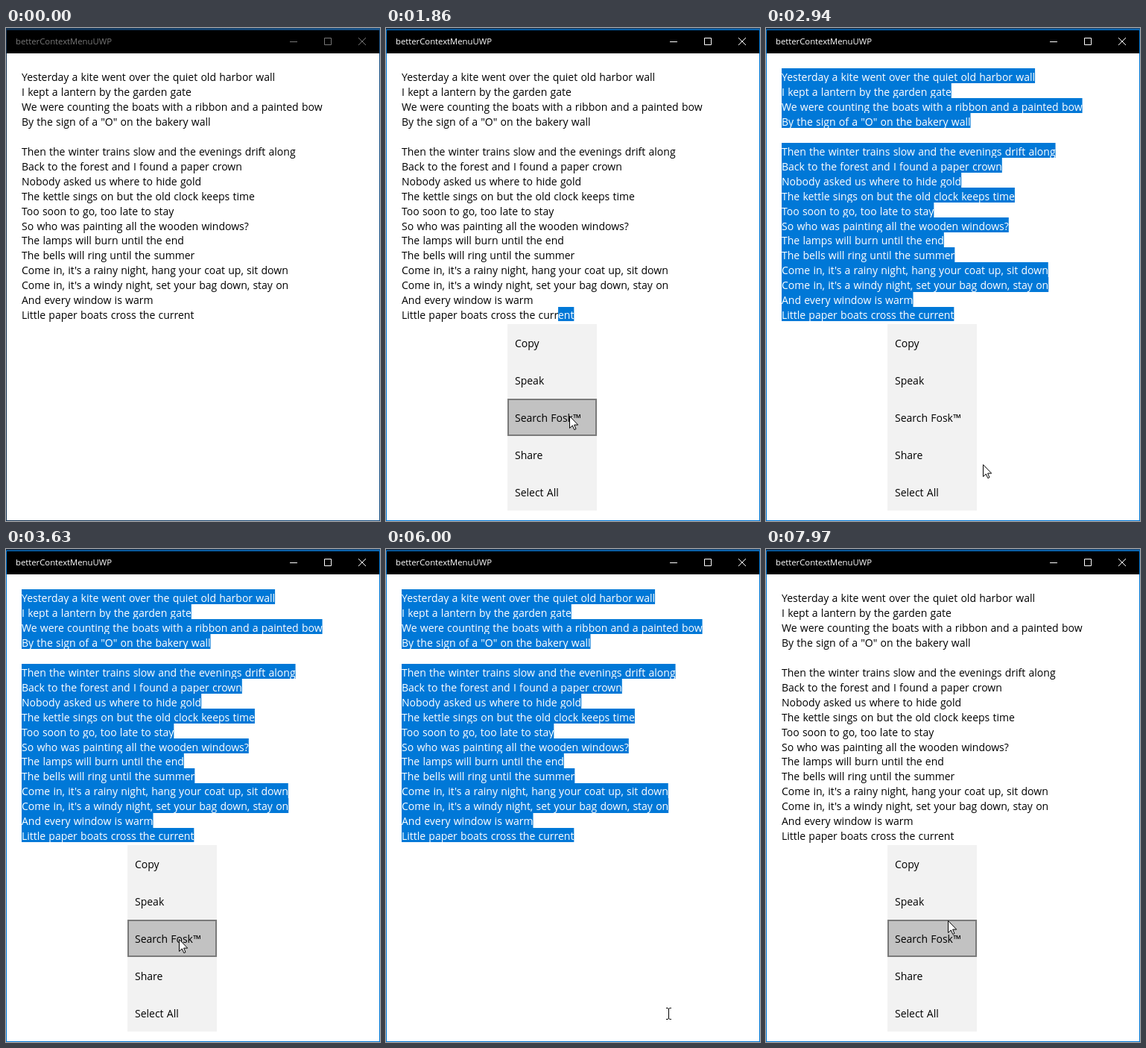
An HTML page that plays this animation: 502x661 px, repeating every 8000 ms.

```html
<!DOCTYPE html>
<html lang="en">
<head>
<meta charset="utf-8">
<title>Context menu</title>
<style>
  html, body { margin: 0; width: 100%; height: 100%; overflow: hidden; background: #fff; }
  svg { display: block; width: 502px; height: 661px; }
  text { font: 14px "Open Sans", "Noto Sans", sans-serif; word-spacing: .6px; white-space: pre; }
  #title { font-size: 11.3px; }
</style>
</head>
<body>
<svg id="stage" viewBox="0 0 502 661" xmlns="http://www.w3.org/2000/svg">
  <linearGradient id="desk">
    <stop offset="0" stop-color="#12304f"/>
    <stop offset="1" stop-color="#1a5286"/>
  </linearGradient>
  <rect width="502" height="661" fill="#fff"/>
  <rect width="502" height="3" fill="url(#desk)"/>
  <rect y="3" width="502" height="31" fill="#000"/>
  <rect id="frame" x=".5" y="2.5" width="501" height="658" fill="none"/>
  <text id="title" x="13" y="22">betterContextMenuUWP</text>
  <path id="buttons" fill="none" d="M381 18.5h10M427.5 13.5h9v9h-9zM473 13l10 10M483 13l-10 10"/>
  <g id="page"></g>
  <g id="menu"></g>
  <path id="arrow" fill="#fff" stroke="#000" d="M.5 .5V16.5L4.3 13L6.8 18.6L9 17.6L6.6 12.1H11.7Z"/>
  <path id="beam" fill="none" stroke="#000" d="M-3 -7.5H-1L.5 -6.5L2 -7.5H4M.5 -6.5V6.5M-3 7.5H-1L.5 6.5L2 7.5H4"/>
</svg>
<script>
const LOOP = 8000, TICK = 75;
const PITCH = 19.95, LEFT = 21, TAIL = 3;
const MENU = { x: 163, y: 397, w: 120, row: 50 };

const lines = `Yesterday a kite went over the quiet old harbor wall
I kept a lantern by the garden gate
We were counting the boats with a ribbon and a painted bow
By the sign of a "O" on the bakery wall

Then the winter trains slow and the evenings drift along
Back to the forest and I found a paper crown
Nobody asked us where to hide gold
The kettle sings on but the old clock keeps time
Too soon to go, too late to stay
So who was painting all the wooden windows?
The lamps will burn until the end
The bells will ring until the summer
Come in, it's a rainy night, hang your coat up, sit down
Come in, it's a windy night, set your bag down, stay on
And every window is warm
Little paper boats cross the current`.split("\n");
const items = ["Copy", "Speak", "Search Fosk™", "Share", "Select All"];

// Moments in ms
const at = {
  enter: 210, focus: 680, mark: 1080, menu: 1160, aim: 1470,
  pressAll: 2400, markAll: 2470, pressSpeak: 4010, fade: 4180, close: 4250,
  relax: 5340, reopen: 6890, aimAgain: 7590
};

// Each glide starts where the one before it ended
const origin = { x: 402, y: 608 };
const glides = [
  { from: at.enter, to: 360, x: 198, y: 412 },
  { from: 530, to: 910, x: 234, y: 384 },
  { from: at.mark, to: at.menu, x: 254, y: 397 },
  { from: at.aim, to: 1860, x: 246, y: 520 },
  { from: 1930, to: 2090, x: 243, y: 620 },
  { from: 2700, to: 2940, x: 291, y: 585 },
  { from: 3010, to: 3480, x: 236, y: 562 },
  { from: 3630, to: 3710, x: 228, y: 484 },
  { from: 5510, to: 5660, x: 320, y: 603 },
  { from: 5810, to: 6120, x: 418, y: 637 },
  { from: 6200, to: 6430, x: 258, y: 429 },
  { from: 7510, to: 7510, x: 256, y: 395 },
  { from: at.aimAgain, to: 7970, x: 244, y: 498 }
];

const byId = id => document.getElementById(id);
const within = (t, a, b) => t >= a && t < b;
const set = (el, attrs) => { for (const k in attrs) el.setAttribute(k, attrs[k]); };
const mix = (a, b, p) => Math.round(a + (b - a) * p);

function add(parent, tag, attrs, text) {
  const el = document.createElementNS("http://www.w3.org/2000/svg", tag);
  set(el, attrs || {});
  if (text) el.textContent = text;
  return parent.appendChild(el);
}

const rows = lines.map((line, i) => {
  const top = n => Math.round(54.3 + PITCH * n);
  const mark = add(byId("page"), "rect", { y: top(i), height: top(i + 1) - top(i), fill: "#0078d7" });
  const text = add(byId("page"), "text", { x: LEFT, y: Math.round(71 + PITCH * i) });
  const cut = Math.max(0, line.length - TAIL);
  const head = add(text, "tspan", {}, line.slice(0, cut));
  const tail = add(text, "tspan", {}, line.slice(cut));
  return { mark, text, head, tail, cut };
});

add(byId("menu"), "rect", { x: MENU.x, y: MENU.y, width: MENU.w, height: MENU.row * items.length, fill: "#f2f2f2" });
const entries = items.map((label, i) => {
  const y = MENU.y + i * MENU.row;
  const group = add(byId("menu"), "g");
  const back = add(group, "rect", { x: MENU.x, y, width: MENU.w, height: MENU.row, fill: "none" });
  const edge = add(group, "rect", { x: MENU.x + 1, y: y + 1, width: MENU.w - 2, height: MENU.row - 2,
    fill: "none", stroke: "#7a7a7a", "stroke-width": 2 });
  add(group, "text", { x: MENU.x + 10, y: y + 31 }, label);
  return { group, back, edge, cx: MENU.x + MENU.w / 2, cy: y + MENU.row / 2 };
});

function pointerAt(t) {
  let pos = origin;
  for (const { from, to, x, y } of glides) {
    if (t < from) break;
    const steps = Math.round((to - from) / TICK) + 1;
    const p = Math.min(1, (Math.floor((t - from) / TICK) + 1) / steps);
    pos = { x: mix(pos.x, x, p), y: mix(pos.y, y, p) };
  }
  return pos;
}

function drawWindow(active) {
  const ink = active ? "#fff" : "#777";
  set(byId("frame"), { stroke: active ? "#0078d7" : "url(#desk)" });
  set(byId("title"), { fill: ink });
  set(byId("buttons"), { stroke: ink });
}

function drawSelection(mode) {
  rows.forEach(({ mark, text, head, tail, cut }, i) => {
    const all = mode === "all", end = all || (mode === "tail" && i === rows.length - 1);
    const full = text.getComputedTextLength();
    const start = all || !cut ? 0 : text.getSubStringLength(0, cut);
    set(mark, { x: LEFT + start, width: end ? full - start : 0 });
    set(head, { fill: all ? "#fff" : "#000" });
    set(tail, { fill: end ? "#fff" : "#000" });
  });
}

function drawMenu(t, hover, pressed) {
  const open = within(t, at.menu, at.close) || t >= at.reopen;
  const step = Math.floor((t - (t >= at.reopen ? at.reopen : at.menu)) / TICK);
  const shift = -Math.round(4 * Math.pow(.48, step));
  const alpha = within(t, at.fade, at.close) ? .4 : 1 - .42 * Math.pow(.35, step);
  set(byId("menu"), { display: open ? "inline" : "none", opacity: alpha, transform: `translate(0 ${shift})` });
  entries.forEach(({ group, back, edge, cx, cy }, i) => {
    const down = i === pressed, over = i === hover && !down;
    set(back, { fill: down ? "#929292" : over ? "#c2c2c2" : "none" });
    set(edge, { display: over ? "inline" : "none" });
    set(group, { transform: down ? `translate(${cx} ${cy}) scale(.983) translate(${-cx} ${-cy})` : "" });
  });
}

function draw(t) {
  const { x, y } = pointerAt(t);
  const isArrow = within(t, at.aim, at.relax) || t >= at.aimAgain;
  const inside = within(x, MENU.x, MENU.x + MENU.w) && y >= MENU.y;
  const hover = isArrow && inside ? Math.floor((y - MENU.y) / MENU.row) : -1;
  const pressing = within(t, at.pressAll, at.markAll) || within(t, at.pressSpeak, at.fade);

  drawWindow(t >= at.focus);
  drawSelection(within(t, at.mark, at.markAll) ? "tail" : within(t, at.markAll, at.reopen) ? "all" : "none");
  drawMenu(t, hover, pressing ? hover : -1);
  for (const id of ["arrow", "beam"]) {
    const shown = t >= at.enter && (id === "arrow") === isArrow;
    set(byId(id), { transform: `translate(${x} ${y})`, visibility: shown ? "visible" : "hidden" });
  }
}

const began = performance.now();
function tick() {
  draw((performance.now() - began) % LOOP);
  requestAnimationFrame(tick);
}
tick();
</script>
</body>
</html>
```
